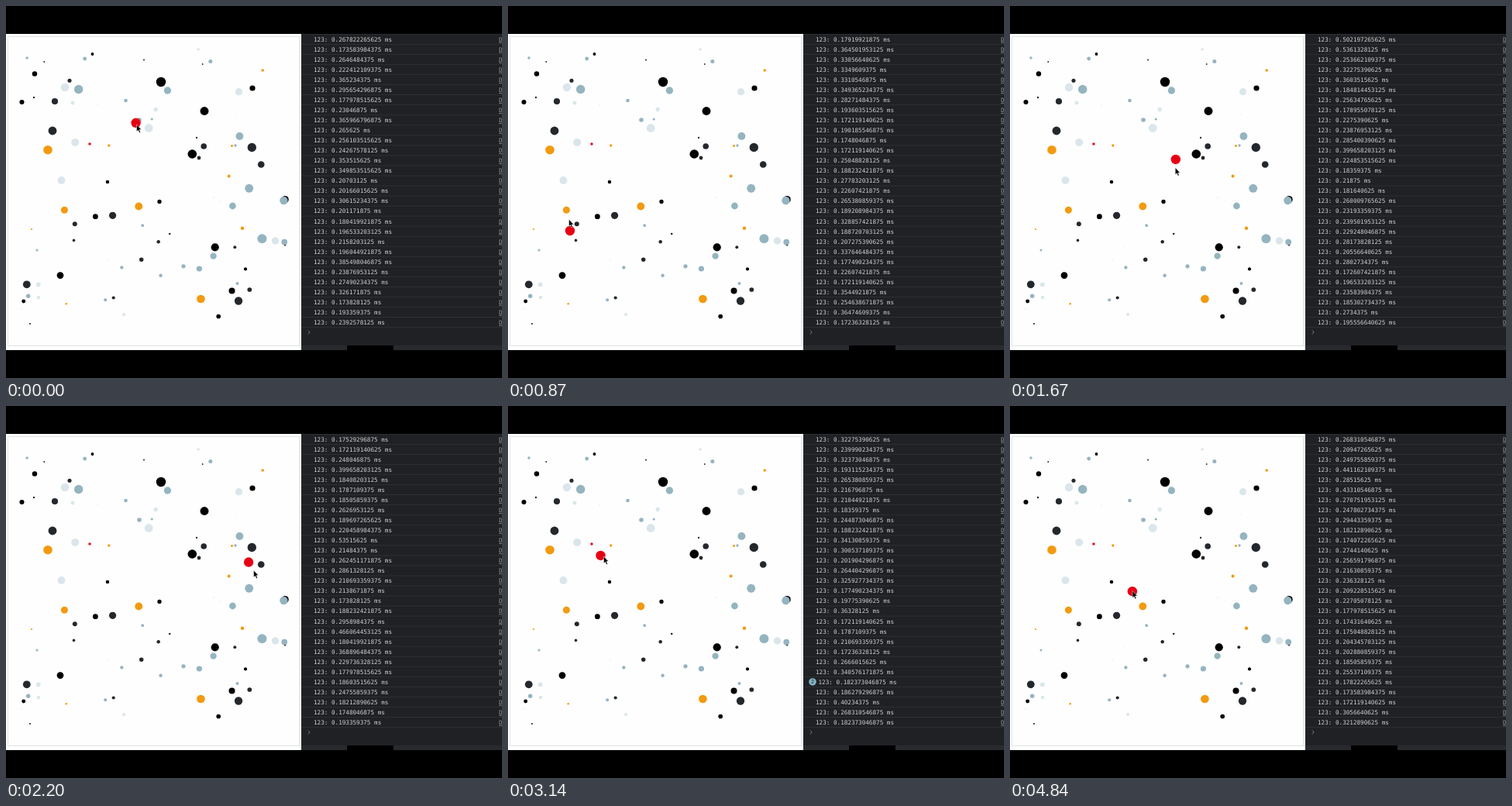
Recreate the animation shown at these times as an HTML page. Size 640 px wide and 480 px high, loop 5000 ms.

```html
<!DOCTYPE html>
<html lang="en">
<head>
<meta charset="utf-8">
<title>Dots and timing log</title>
<style>
html, body { margin: 0; width: 100%; height: 100%; overflow: hidden; background: #000; }
svg { display: block; width: 640px; height: 480px; }
text { font: 7.63px "DejaVu Sans Mono", monospace; fill: #cfd0d2; white-space: pre; }
.link { fill: #96999d; text-decoration: underline; }
.badge { font: 7px "Liberation Sans", sans-serif; fill: #202124; text-anchor: middle; }
</style>
</head>
<body>
<svg viewBox="0 0 640 480">
  <rect width="640" height="480" fill="#000"/>
  <rect y="36" width="381" height="408" fill="#fff"/>
  <rect x="2.5" y="39.5" width="376" height="399" fill="#fefefe" stroke="#dfe3e5"/>
  <g id="dots"></g>
  <circle id="ball" r="6.2" fill="#e60013"/>
  <path id="cursor" d="M0 0V9L2 7.2L3.5 10.6L5 10L3.6 6.6H6.3Z" fill="#000" stroke="#fff" stroke-width=".5"/>
  <rect x="381" y="36" width="259" height="408" fill="#202124"/>
  <g id="log"></g>
  <path d="M389.8 418.6L392.2 421L389.8 423.4" fill="none" stroke="#7d868d" stroke-width=".9"/>
  <rect x="381" y="438" width="259" height="6" fill="#292a2d"/>
  <rect x="440" y="438" width="60" height="6" fill="#000"/>
</svg>
<script>
const LOOP = 5000, STEP = 100 / 3, LAST = 128;
const ROWS = 29, ROW_H = 13.04, PER_STEP = 3, REPEATED = 306;
const $ = id => document.getElementById(id);

let seed = 7;
function random() {
  seed = (seed * 16807) % 2147483647;
  return seed / 2147483647;
}

function add(parent, tag, attrs, text = "") {
  const el = document.createElementNS("http://www.w3.org/2000/svg", tag);
  for (const k in attrs) el.setAttribute(k, attrs[k]);
  el.textContent = text;
  parent.append(el);
  return el;
}

// Centres run from the largest dot to the smallest; radii shrink evenly.
function dots(fill, from, to, centres) {
  centres.forEach(([cx, cy], i) => {
    const r = from + (to - from) * i / Math.max(centres.length - 1, 1);
    add($("dots"), "circle", { cx, cy, r, fill });
  });
}
const BLACK = "#000", DARK = "#24282c", BLUE = "#94b4c0", PALE = "#dae6eb",
  ORANGE = "#f39a0f", RED = "#e60013";

dots(BLACK, 6.2, 4, [[200, 98], [240.3, 191], [256, 135.5], [269.7, 311.3],
  [360, 249.7], [70, 347.6], [291.5, 367.5]]);
dots(BLACK, 3.6, 1.9, [[318, 106], [115.4, 271.7], [37, 87.5], [20.5, 124],
  [274.2, 400.5], [198, 252.5], [22.7, 381], [131, 227], [309, 339.4], [111.5, 62]]);
dots(DARK, 5.7, 3.8, [[317.3, 182.5], [60, 161], [300, 380.5], [26.8, 359.3],
  [137.6, 270.3], [329.2, 204.5], [63, 123], [255.2, 181]]);
dots(DARK, 3, 1.8, [[88.8, 281.2], [314.3, 366], [174.7, 327.2], [82, 96.2], [249, 196],
  [196.7, 304.2], [138.7, 376.5], [295.3, 311.3], [87.5, 302.4]]);
dots(DARK, 1.3, .9, [[211.2, 294], [360, 308.3], [36, 118], [246, 170], [31, 410],
  [178, 69.5], [49.3, 72], [253.7, 75]]);
dots(PALE, 5.4, 4.6, [[184.2, 157.5], [76, 105], [89.2, 176], [71.5, 225], [347.5, 303],
  [300.5, 110.7]]);
dots(PALE, 2.9, 1.8, [[41.8, 359.3], [193.2, 133.5], [86, 125], [42, 376], [152, 398],
  [248, 56]]);
dots(BLUE, 6, 3.6, [[330.4, 300.3], [93.7, 107.5], [313.7, 235.3], [358.4, 251],
  [301.4, 168], [208.4, 109], [292.4, 258], [267.6, 322.7], [359.2, 304.5], [249.4, 339]]);
dots(BLUE, 2.8, 1.5, [[172, 147], [28.7, 374.2], [229, 335.8], [263.8, 71.5],
  [101.7, 68], [154.5, 122], [199.6, 347.7], [149.4, 337.5], [128.2, 379.3],
  [298.5, 358], [176.2, 283.2], [27, 67], [296, 180], [188.2, 146], [40, 315]]);
dots(ORANGE, 5.8, 4.5, [[54, 185.7], [251.4, 378], [171.3, 258.5], [75.4, 263.2]]);
dots(ORANGE, 2.2, 1.1, [[305, 286.7], [287.6, 219.5], [331.2, 83], [132.8, 180],
  [291.5, 180.5], [77.7, 384.3], [33, 288]]);
dots(RED, 1.7, 1.7, [[108, 178]]);
dots(PALE, .8, .6, Array.from({ length: 8 }, () => [20 + 340 * random(), 50 + 370 * random()]));

// Pointer path: step, x, y. The ball trails by one step.
const path = [
  [0, 168.5, 153], [5, 176, 160.5], [10, 157.5, 197], [14, 151.5, 192.5], [18, 145.5, 193],
  [25, 80, 290], [32, 106.5, 88], [37, 166.5, 90.5], [42, 226.5, 93], [51, 215, 215],
  [61, 287, 167], [66, 319.5, 212], [71, 352, 257], [82, 205, 320], [89, 111, 197],
  [94, 123.5, 194], [99, 136, 192], [106, 149, 243], [111, 148.5, 254.5],
  [122, 157, 243], [LAST, 158, 238.5]];

function slope(i, k) {
  const a = path[Math.max(i - 1, 0)], b = path[Math.min(i + 1, path.length - 1)];
  return (b[k] - a[k]) / (b[0] - a[0]);
}
function pointAt(n) {
  let i = 0;
  while (i < path.length - 2 && path[i + 1][0] <= n) i++;
  const a = path[i], b = path[i + 1], d = b[0] - a[0], u = (n - a[0]) / d;
  const u2 = u * u, u3 = u2 * u, h = 3 * u2 - 2 * u3;
  return [1, 2].map(k => a[k] + (b[k] - a[k]) * h
    + d * ((u3 - 2 * u2 + u) * slope(i, k) + (u3 - u2) * slope(i + 1, k)));
}

// Mostly short readings with rare spikes; the timer ticks in 1/4096 ms.
const lines = Array.from({ length: LAST * PER_STEP + ROWS }, () => {
  const r = random(), ms = .172 + .17 * r ** 1.6 + .22 * r ** 20;
  return `123: ${Math.round(ms * 4096) / 4096} ms`;
});

const log = $("log"), rows = [];
for (let i = 0; i <= ROWS; i++)
  add(log, "rect", { x: 381, y: 36 + i * ROW_H, width: 259, height: .8, fill: "#303236" });
for (let i = 0; i < ROWS; i++) {
  const y = 45.8 + i * ROW_H;
  add(log, "text", { x: 636, y, class: "link" }, "D");
  rows.push(add(log, "text", { y }));
}
const badge = add(log, "g", {});
add(badge, "circle", { cx: 393, r: 4.8, fill: "#80b4c6" });
add(badge, "text", { x: 393, y: 2.5, class: "badge" }, "2");

const moveTo = (el, [x, y]) => el.setAttribute("transform", `translate(${x} ${y})`);

function draw(now) {
  const n = Math.min(Math.floor((now % LOOP + 5) / STEP), LAST);
  const first = n * PER_STEP, marked = REPEATED - first;
  moveTo($("cursor"), pointAt(n));
  moveTo($("ball"), pointAt(n - 1));
  rows.forEach((row, i) => {
    row.textContent = lines[first + i];
    row.setAttribute("x", i === marked ? 400.5 : 397);
  });
  badge.setAttribute("visibility", rows[marked] ? "visible" : "hidden");
  moveTo(badge, [0, 43 + marked * ROW_H]);
}
const start = performance.now();
function tick() {
  draw(performance.now() - start);
  requestAnimationFrame(tick);
}
tick();
</script>
</body>
</html>
```
